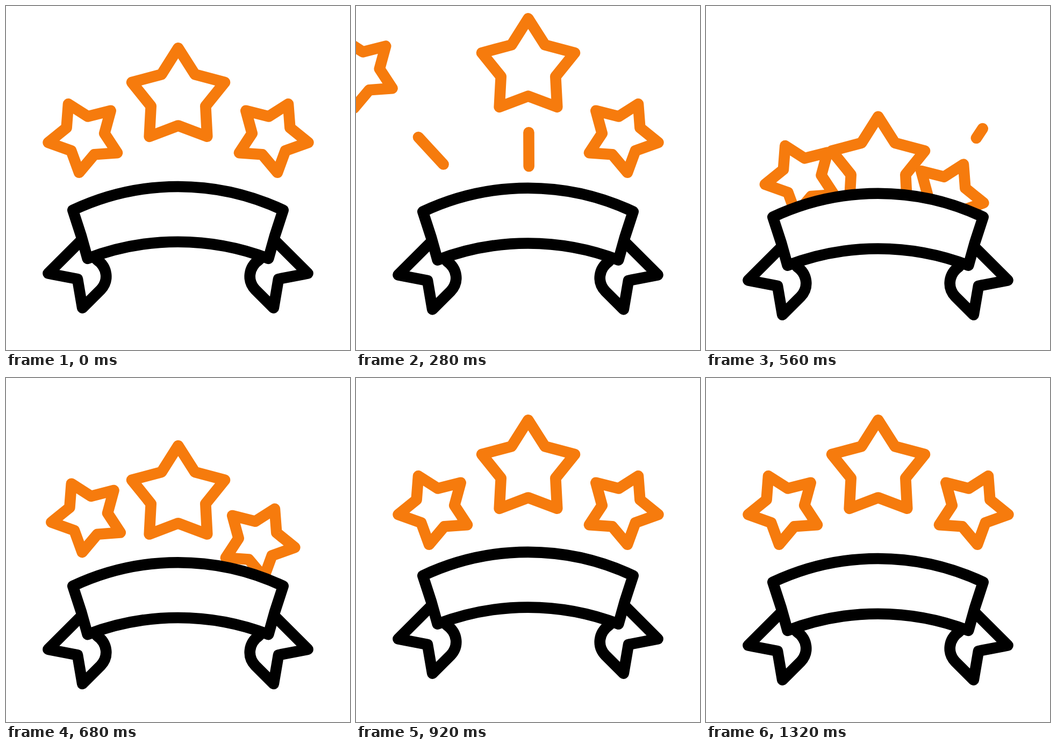
Write an HTML page that moves like this. It is 640 px wide and 640 px high and loops after 1480 ms.

```html
<!DOCTYPE html>
<html lang="en">
<head>
<meta charset="utf-8">
<title>Award ribbon</title>
<style>
  html, body { margin: 0; width: 100%; height: 100%; overflow: hidden; background: #fff; }
  svg { display: block; width: 100%; height: 100%; }
  .line { fill: none; stroke-width: 20.6; stroke-linecap: round; stroke-linejoin: round; }
  .gold { stroke: #f67b0d; }
  .ink { stroke: #000; }
</style>
</head>
<body>
<svg viewBox="0 0 640 640">
  <defs>
    <path id="big" d="M320.300 78.300L351.500 127.300 407 142 371.300 186.200 374.300 242.800 320.300 222.500 266.700 242.800 269.700 186.200 234 142 289.300 127.300Z"/>
    <path id="small" d="M116 182.300L152.200 205.500 194.700 194.700 183.200 237 207 273.200 164.200 276.300 136 309.800 121.200 269.200 78.600 254 112.600 226.500Z"/>
    <path id="tail" d="M140 436L78.400 497.500 133 508 142.200 561.700 176 528C192 511 189 486 169 472"/>
    <clipPath id="above">
      <path id="edge" d="M0-100H640V380H516A458.500 458.500 0 0 0 124 380H0Z"/>
    </clipPath>
  </defs>
  <g class="line gold" clip-path="url(#above)" id="sky"></g>
  <g class="line ink" id="ribbon">
    <use href="#tail"/>
    <use href="#tail" transform="matrix(-1 0 0 1 640 0)"/>
    <path fill="#fff" d="M124.300 379.800A458.500 458.500 0 0 1 515.700 379.800L500 428 488.300 469.800A470.700 470.700 0 0 0 151.700 469.800L140 428Z"/>
  </g>
</svg>
<script>
const LOOP = 1480, STEP = 40;
const $ = id => document.getElementById(id);
const sky = $('sky'), ribbon = $('ribbon'), edge = $('edge');

const SMOOTH = [0, 1], LINEAR = [1 / 3, 2 / 3];
const SIDE = [0.409, 0.826], MIDDLE = [0.465, 0.882];

// Eased progress from time a to time b
function ease(t, a, b, [c, d] = SMOOTH) {
  const p = Math.min(1, Math.max(0, (t - a) / (b - a))), q = 1 - p;
  return 3 * q * q * p * c + 3 * q * p * p * d + p * p * p;
}

function add(tag, attrs) {
  const el = document.createElementNS('http://www.w3.org/2000/svg', tag);
  for (const k in attrs) el.setAttribute(k, attrs[k]);
  return sky.appendChild(el);
}

// out: flight away, from: hidden start of the return
const stars = [
  { shape: '#small', leave: 120, out: [-230, -198], from: [76, 189], back: 720, curve: SIDE },
  { shape: '#big', leave: 200, out: [0, -277], from: [0, 265], back: 800, curve: MIDDLE },
  { shape: '#small', flip: true, leave: 280, out: [230, -200], from: [-77, 188], back: 880, curve: SIDE }
];
const streaks = [
  { a: [209.500, 345.500], b: [116, 244], head: [120, 270], tail: [147, 412] },
  { a: [321.800, 340], b: [321.300, 197], head: [165, 322], tail: [195, 486] },
  { a: [440.300, 340.600], b: [514.700, 228], head: [285, 445], tail: [331, 603] }
];

for (const s of stars) {
  s.going = add('use', { href: s.shape });
  s.coming = add('use', { href: s.shape });
}
for (const s of streaks) s.el = add('line', {});

function move(el, [x, y], k, flip) {
  const turn = flip ? ' matrix(-1 0 0 1 641 0)' : '';
  el.setAttribute('transform', `translate(${x * k} ${y * k})${turn}`);
}

function draw(t) {
  const drop = 12.8 * (ease(t, 160, 560) - 2 * ease(t, 560, 960) + ease(t, 960, 1320));
  move(ribbon, [0, 1], drop);
  move(edge, [0, 1], drop);

  for (const s of stars) {
    move(s.going, s.out, ease(t, s.leave, s.leave + 280), s.flip);
    move(s.coming, s.from, 1 - ease(t, 400, s.back, s.curve), s.flip);
  }

  for (const { el, a, b, head, tail } of streaks) {
    const h = ease(t, ...head, LINEAR), k = ease(t, ...tail, LINEAR);
    const at = (p, i) => a[i] + (b[i] - a[i]) * p;
    el.setAttribute('visibility', h > 0 && k < 1 ? 'visible' : 'hidden');
    el.setAttribute('x1', at(k, 0));
    el.setAttribute('y1', at(k, 1));
    el.setAttribute('x2', at(h, 0));
    el.setAttribute('y2', at(h, 1));
  }
}

const start = performance.now();
function tick() {
  const t = (performance.now() - start) % LOOP;
  draw(Math.floor(t / STEP) * STEP);
  requestAnimationFrame(tick);
}
tick();
</script>
</body>
</html>
```
